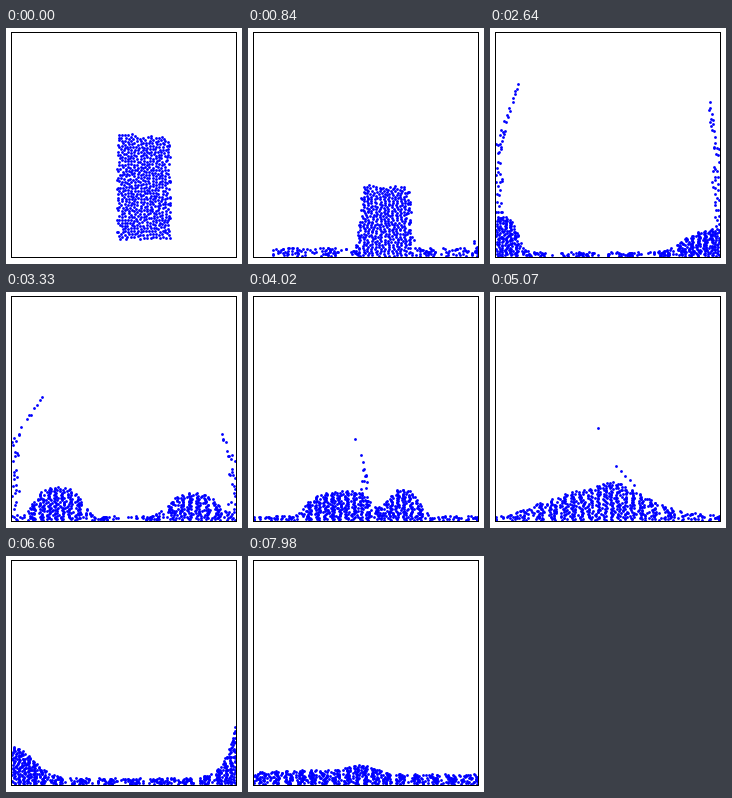
A matplotlib script for the animation above (8000 ms loop, 236 by 236 pixels).

```python
import numpy as np
import matplotlib.pyplot as plt
from matplotlib.animation import FuncAnimation
from matplotlib.patches import Rectangle

SIZE, LOOP, TICK, STEP = 236, 8000, 10, 30
LEFT, RIGHT, FLOOR = 6, 229, 228
COUNT = 600
BLOCK_X, BLOCK_W, BLOCK_H, DROP = 111, 53, 105, 17.5
FALL = 8.4e-5            # half of gravity, px per ms^2
SPARSE = 0.3             # density of thin sheets against the bulk
rng = np.random.default_rng(4)


def relaxed_block(rounds=12, reach=2.9):
    """Random but evenly spaced particles, as fractions of the block."""
    cols = 17
    i = np.arange(COUNT)
    x = (i % cols + rng.uniform(0, 1, COUNT)) * BLOCK_W / cols
    y = (i // cols + rng.uniform(0, 1, COUNT)) * BLOCK_H / (COUNT // cols + 1)
    for _ in range(rounds):
        dx, dy = x[:, None] - x, y[:, None] - y
        d = np.hypot(dx, dy) + 1e-6
        push = np.where(d < reach, 0.2 * (reach - d) / d, 0)
        x = np.clip(x + (push * dx).sum(1), 0, BLOCK_W)
        y = np.clip(y + (push * dy).sum(1), 0, BLOCK_H)
    return x / BLOCK_W, y / BLOCK_H


u, v = relaxed_block()


def track(t, *keys):
    """Ease through a few (time, value) points."""
    for (t0, a), (t1, b) in zip(keys, keys[1:]):
        if t < t1:
            s = np.clip((t - t0) / (t1 - t0), 0, 1)
            return a + (b - a) * s * s * (3 - 2 * s)
    return keys[-1][1]


def arc(t, start, top, end, peak, rise=2):
    """Climb from start to top, then fall back by end."""
    if t < top:
        s = ((top - t) / (top - start)) ** rise
    else:
        s = ((t - top) / (end - top)) ** 2
    return peak * max(0, 1 - s)


def bump(x, centre, height, width, power=2):
    return height * np.exp(-np.abs((x - centre) / width) ** power)


def sheets(t):
    """Heights of the water running up the left and right walls."""
    return (arc(t, 950, 2560, 4000, 175, 1.6),
            arc(t, 730, 2350, 3780, 172, 1.6))


def surface(x, t):
    """Depth of the dense water and of the sparse water on top of it."""
    film = track(t, (450, 0), (900, 9), (1680, 10), (2640, 4), (5070, 4),
                 (6660, 6), (7980, 10))
    block = np.clip(BLOCK_H + DROP - FALL * t * t, 0, BLOCK_H)
    edge = track(t, (450, 60), (1000, 4))
    bulk = film + bump(x, BLOCK_X + BLOCK_W / 2, block, 27, edge)

    # waves returning from both walls
    bulk += bump(x, track(t, (2500, LEFT), (4020, 87), (5070, 62)),
                 track(t, (1300, 0), (2640, 36), (4020, 22), (5070, 8), (5800, 0)),
                 track(t, (2640, 22), (4020, 32)), 4)
    bulk += bump(x, track(t, (2500, RIGHT), (4020, 156)),
                 track(t, (1300, 0), (2640, 23), (4020, 25), (5070, 0)),
                 track(t, (2640, 40), (4020, 18)), 3)
    # mound where they meet
    bulk += bump(x, 121,
                 track(t, (3700, 0), (4020, 9), (4500, 42), (5070, 36), (6300, 0)),
                 track(t, (4000, 30), (5070, 48), (6000, 90)), 1.6)
    # second, lower run-up and its backwash
    bulk += bump(x, LEFT, arc(t, 5500, 6550, 7600, 32), 28)
    bulk += bump(x, RIGHT, arc(t, 5500, 6420, 7350, 60), 10, 1)
    bulk += bump(x, track(t, (6700, LEFT), (7980, 60)),
                 track(t, (6600, 0), (7400, 8), (7980, 4)), 60)
    bulk += bump(x, 113, track(t, (7200, 0), (7980, 8)), 20)

    lo, hi = sheets(t)
    sheet = bump(x, LEFT, lo, 7, 6) + bump(x, RIGHT, hi, 7, 6)
    jet = bump(x, 116, arc(t, 3800, 4050, 4600, 34), 3.5, 4)
    return bulk, np.maximum(sheet - bulk, 0) + jet


def fluid(t):
    spread = max(0, t - 450)
    x = np.linspace(max(LEFT, BLOCK_X - 0.22 * spread),
                    min(RIGHT, BLOCK_X + BLOCK_W + 0.23 * spread), 600)
    bulk, thin = surface(x, t)
    mass = bulk + SPARSE * thin
    cdf = np.cumsum(mass)
    px = np.interp(u, (cdf - cdf[0]) / (cdf[-1] - cdf[0]), x)

    deep = np.interp(px, x, bulk)
    q = v * np.interp(px, x, mass)
    up = np.where(q < deep, q, deep + (q - deep) / SPARSE)

    # the top of each sheet peels off its wall
    lean = np.clip((t - 1400) / 56, 0, 30)
    for wall, side, high, far in zip((LEFT, RIGHT), (1, -1), sheets(t),
                                     (lean, lean / 2)):
        off = (px - wall) * side
        s = np.clip((up / max(high, 1) - 0.65) / 0.35, 0, 1)
        s = np.where((off < 12) & (up > deep), s, 0)
        px = px + side * s * (far - 0.6 * off)
    lift = max(0, DROP - FALL * t * t)
    return px, FLOOR - lift - up


# spray: one high drop and a string of lower ones, between two moments
T0, T1 = 4020, 5070
A = np.column_stack([(107, 147), np.linspace((113, 163), (119, 190), 5).T])
B = np.column_stack([(108, 136), np.linspace((126, 174), (144, 193), 5).T])


def spray(t):
    x, y = A + (B - A) * (t - T0) / (T1 - T0)
    if t < T0:
        return x, A[1] + 0.3 * (T0 - t)
    return x, y - FALL * (t - T0) * (T1 - t)


fig = plt.figure(figsize=(SIZE / 100, SIZE / 100), dpi=100, facecolor="white")
ax = fig.add_axes([0, 0, 1, 1])
ax.set(xlim=(0, SIZE), ylim=(SIZE, 0))
ax.axis("off")
pixel = 72 / fig.dpi
tank = Rectangle((5, 4), 225, 225, fill=False, ec="black", lw=pixel,
                 zorder=3, antialiased=False)
ax.add_patch(tank)
dots, = ax.plot([], [], "o", color="blue", ms=2.8 * pixel, mew=0)
dots.set_clip_path(tank)


def draw(i):
    t = i * TICK // STEP * STEP
    dots.set_data(*np.hstack([fluid(t), spray(t)]))
    return dots,


anim = FuncAnimation(fig, draw, frames=LOOP // TICK, interval=TICK,
                     repeat=True, repeat_delay=0)
plt.show()
```
